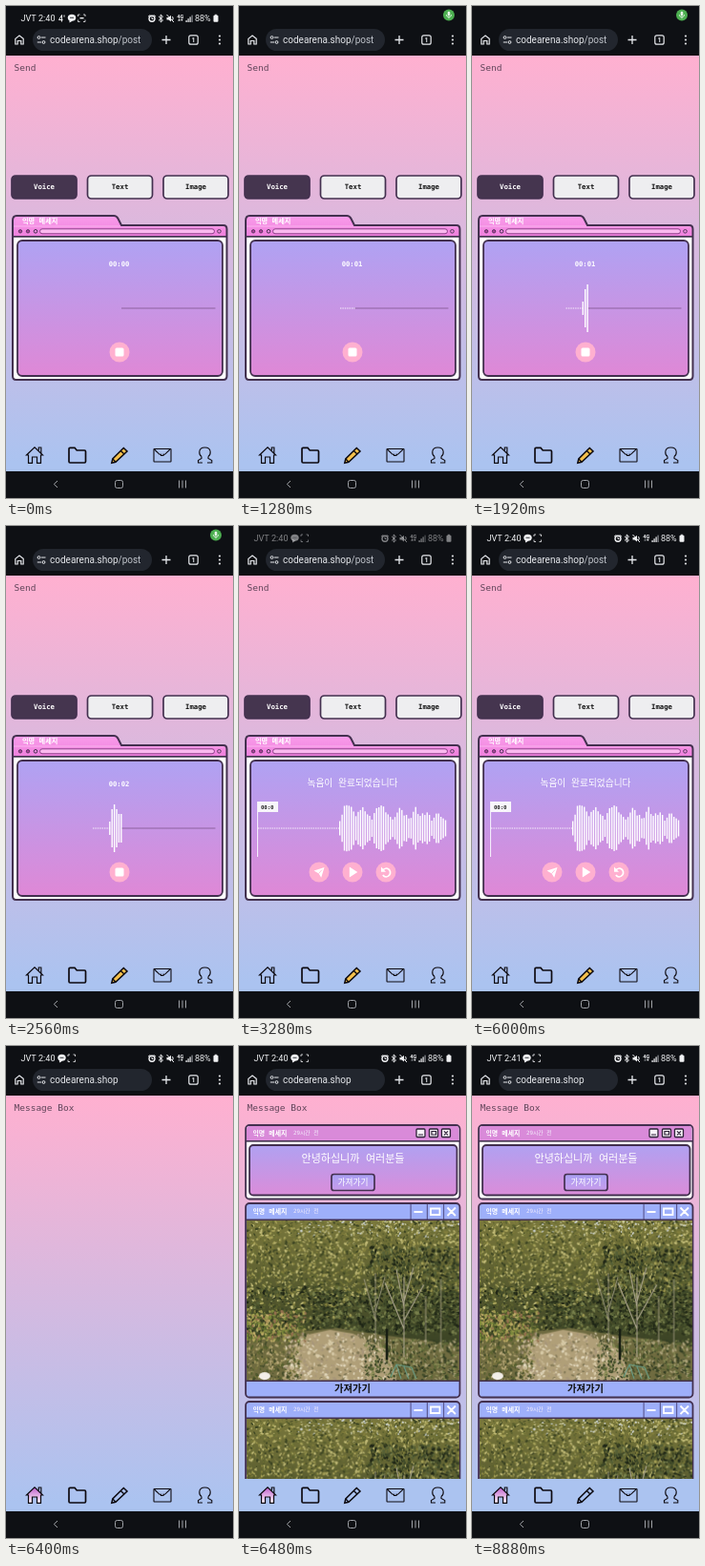
Animation, 238 px wide and 516 px high, one loop 9.36 s. Source, as an HTML page with a canvas:

```html
<!DOCTYPE html>
<html lang="ko">
<head>
<meta charset="utf-8">
<title>Voice message</title>
<style>
html, body { margin: 0; width: 100%; height: 100%; overflow: hidden; background: #0e1014; }
canvas { display: block; width: 238px; height: 516px; }
</style>
</head>
<body>
<canvas id="stage"></canvas>
<script>
const W = 238, H = 516, LOOP = 9360, TICK = 80;
const INK = '#43304f', DARK = '#0e1014', PINK = '#ffb0d0', SKY = '#abc3f0';
const PIXEL = '"DejaVu Sans Mono", "Noto Sans Mono CJK KR", "Noto Sans CJK KR", monospace';
const UI = 'Roboto, sans-serif';

const stage = document.getElementById('stage');
const dpr = window.devicePixelRatio || 1;
stage.width = W * dpr;
stage.height = H * dpr;
let c = stage.getContext('2d');
c.scale(dpr, dpr);

// ---------- helpers ----------
function box(x, y, w, h, r, fill, stroke, lw = 2) {
  c.beginPath();
  c.roundRect(x, y, w, h, r);
  paint(fill, stroke, lw);
}
function paint(fill, stroke, lw = 1) {
  if (fill) { c.fillStyle = fill; c.fill(); }
  if (stroke) { c.strokeStyle = stroke; c.lineWidth = lw; c.stroke(); }
}
function shape(d, fill, stroke, lw, x = 0, y = 0) {
  c.save();
  c.translate(x, y);
  if (fill) { c.fillStyle = fill; c.fill(new Path2D(d)); }
  if (stroke) { c.strokeStyle = stroke; c.lineWidth = lw || 1; c.stroke(new Path2D(d)); }
  c.restore();
}
function disc(x, y, r, fill, stroke, lw) {
  c.beginPath();
  c.arc(x, y, r, 0, 7);
  paint(fill, stroke, lw);
}
function rect(x, y, w, h, fill) {
  c.fillStyle = fill;
  c.fillRect(x, y, w, h);
}
function fade(y0, y1, a, b) {
  const g = c.createLinearGradient(0, y0, 0, y1);
  g.addColorStop(0, a);
  g.addColorStop(1, b);
  return g;
}
function text(s, x, y, size, fill, align = 'left', weight = 700, font = PIXEL) {
  c.font = `${weight} ${size}px ${font}`;
  c.textAlign = align;
  c.textBaseline = 'alphabetic';
  c.fillStyle = fill;
  c.fillText(s, x, y);
}
function random(seed) {
  return () => (seed = (seed * 16807) % 2147483647) / 2147483647;
}

// ---------- phone chrome ----------
// The capture icon blinks at these times; the data arrows flip at others.
const BLINKS = [160, 3680, 3920, 4560, 5120, 5680, 6000, 6960, 7440, 7600, 7920, 8640, 8880];
const DATA = [5280, 7440, 8400];
const odd = (list, t) => list.filter(v => v <= t).length % 2 === 1;

function statusBar(t) {
  if (t >= 400 && t < 3120) {
    disc(220, 9.5, 6, '#4caf50');
    box(218.7, 5.8, 2.6, 4.6, 1.3, '#e8f5e9');
    shape('M217.3 9Q217.3 11.6 220 11.6T222.7 9M220 11.6V13.3', null, '#e8f5e9', .8);
    return;
  }
  c.globalAlpha = t >= 3120 && t < 3440 ? (t - 3120) / 320 : 1;
  const white = '#f1f2f4';
  text(t < 7440 ? 'JVT 2:40' : 'JVT 2:41', 15.5, 16.3, 9.1, white, 'left', 400, UI);
  let x = t < 7440 ? 54.5 : 53.5;
  if (t < 400) {
    shape('M0 6L3 1V8M0 6H4M5.5 1V3', null, white, 1, x + 1, 8.5);
    x += 10.5;
  }
  c.beginPath();
  c.ellipse(x + 4, 12.3, 4.2, 3.5, 0, 0, 7);
  paint(white);
  shape('M1.5 14L1.5 17.5L5 15.5Z', white, null, 0, x, 0);
  rect(x + 2, 11.8, 4, 1, '#33363b');
  shape('M0 2V0H2M5.5 0H7.5V2M7.5 5.5V7.5H5.5M2 7.5H0V5.5', null, white, .8, x + 10.5, 9);
  if (!odd(BLINKS, t)) rect(x + 12.5, 12, 4, 1.4, white);

  disc(153, 13.3, 3, null, white, 1.4);
  shape('M149.3 11L151 9.3M155 9.3L156.7 11M153 11.5V13.5H154.5', null, white, 1);
  shape('M160 10.8L164.5 15L162.2 17V9L164.5 11.2L160 15.4', null, white, 1);
  shape('M168.5 12H170.5L173 9.7V16.5L170.5 14.5H168.5Z', white);
  shape('M168.5 9L176 17M174.5 11Q176 13 174.5 15', null, white, 1);
  text('4G', 179.3, 13, 5.6, white, 'left', 700, UI);
  const up = odd(DATA, t) ? '#777b80' : white;
  shape('M180 15.5L181.7 13.3L183 15.5Z', up);
  shape('M183 13.7L184.3 16L185.7 13.7Z', white);
  for (let i = 0; i < 4; i++) rect(188.5 + i * 2, 15 - i * 1.8, 1.2, 2 + i * 1.8, i < 3 ? white : '#8d9095');
  text('88%', 198, 16.3, 9, white, 'left', 400, UI);
  box(217.5, 9.8, 5, 7, 1, white);
  rect(218.8, 8.8, 2.4, 1, white);
  c.globalAlpha = 1;
}

function browser(t, path) {
  rect(0, 0, W, 52, DARK);
  statusBar(t);
  const white = '#e6e8ec';
  shape('M9.8 34.4L14 31L18.2 34.4V40H15.8V36.5H12.2V40H9.8Z', null, white, 1.2);
  box(28, 24, 125, 23, 11.5, '#22262e');
  disc(34.5, 33, 1.4, null, white, 1);
  disc(39.5, 38, 1.4, null, white, 1);
  shape('M37 33H41.5M32.8 38H37', null, white, 1.1);
  text('codearena.shop', 46, 39.2, 10, white, 'left', 400, UI);
  if (path) text(path, 46 + c.measureText('codearena.shop').width, 39.2, 10, '#c0c4cb', 'left', 400, UI);
  shape('M163.5 35.5H172.5M168 31V40', null, white, 1.3);
  box(191.8, 30.8, 9.4, 9.4, 2, null, white, 1.2);
  text('1', 196.5, 38, 7, white, 'center', 700, UI);
  for (const y of [31.5, 35.5, 39.5]) disc(224, y, 1.1, white);
}

function androidBar() {
  rect(0, 488, W, 28, DARK);
  const grey = '#a0a3a8';
  shape('M54 498L50.3 501.5L54 505', null, grey, 1);
  box(114.5, 497.5, 8, 8, 2, null, grey, 1);
  shape('M181.5 497.5V505.5M185 497.5V505.5M188.5 497.5V505.5', null, grey, 1);
}

function tabBar(home) {
  const ink = '#0d0a10';
  const house = 'M23.5 479.3V471H21.5L30 462.8L38.5 471H36.5V479.3H32.5V473H27.5V479.3Z';
  shape(house, home ? fade(464, 478, '#c468cf', '#fbeefa') : null, ink, 1.2);
  shape('M34.3 466V463H36.8V469', null, ink, 1.2);
  shape('M66 464.5Q66 463.3 67.2 463.3H72L74.2 466H82.3Q83.5 466 83.5 467.2V477.8Q83.5 479 82.3 479H67.2Q66 479 66 477.8Z', null, ink, 1.7);
  shape('M110.8 479.2L111.8 475L123.3 463.5L127 467L115 478.3Z', home ? null : '#f5c04c', ink, 1.5);
  shape('M120.3 466.5L124 470M111.8 475L115 478.3', null, ink, 1.4);
  box(155, 464.5, 18, 13.5, .5, null, ink, 1.1);
  shape('M155.5 465L161 470.3H162.5V471.5H165V470.3H166.5L172 465', null, ink, 1.1);
  shape('M205 472.5Q202.5 471 202.8 467.5Q203.2 463 208.5 463T214.2 467.5Q214.5 471 212 472.5M205 472.5V474.5L201.5 476.5V479H206M212 472.5V474.5L215.8 476.5V479H211', null, ink, 1.1);
}

// ---------- recorder ----------
const SCROLL = 15 / 1280, MID = 317, HEAD = 121;
const LIVE = [7, 20, 25, 20, 15, 15, 20, 17];
const ENVELOPE = [10, 26, 24, 13, 25, 20, 11, 27, 25, 18, 10, 23, 17, 11, 23, 14, 20, 10, 18, 11, 7];

function bar(x, half) {
  rect(x, MID - half, 1.4, half * 2, '#fff');
}
function dots(x0, x1) {
  for (let x = x0; x < x1; x += 2.4) rect(x, MID - .5, 1.4, 1, 'rgba(255,255,255,.85)');
}
function recording(t) {
  const sec = Math.floor(t / 1000);
  text('00:0' + sec, 118.5, 272.5, 7.2, '#fff', 'center');
  rect(HEAD, MID - .5, 98.5, 1, '#8d63a0');
  const start = HEAD - t * SCROLL;
  const voice = HEAD - (t - 1460) * SCROLL;
  dots(start, Math.min(HEAD, voice));
  LIVE.forEach((half, i) => {
    const x = voice + i * 2.4;
    if (x < HEAD - .4) bar(x, half);
  });
  disc(119, 363, 10.5, PINK);
  box(114.5, 358.5, 9, 9, 1.5, '#fff');
}
function recorded() {
  text('녹음이 완료되었습니다', 119, 273.3, 9.7, '#fff', 'center', 500);
  dots(20, 105);
  const rnd = random(41);
  const n = 47;
  for (let i = 0; i < n; i++) {
    const p = i / n * (ENVELOPE.length - 1), k = Math.floor(p);
    const half = ENVELOPE[k] + (ENVELOPE[k + 1] - ENVELOPE[k]) * (p - k);
    bar(105 + i * 2.41, half * (.75 + .25 * rnd()));
  }
  rect(19, 289, 1, 58, '#f4eefc');
  rect(19, 289, 22, 11, '#f7f5fa');
  text('00:0', 23, 297, 5.6, '#222');

  for (const x of [84, 119, 154]) disc(x, 363, 10.5, PINK);
  shape('M78.5 361.5L89.5 358L86.2 368.7L83.6 364.5Z', '#fff');
  shape('M83.6 364.5L87 360.5', null, PINK, .8);
  shape('M115.8 357.5L124.3 363L115.8 368.5Z', '#fff');
  c.beginPath();
  c.arc(154.3, 363.5, 4.3, -2.5, 2.5);
  paint(null, '#fff', 1.7);
  shape('M149 357.5V362.8H154Z', '#fff');
}
function modeButton(x, label, on) {
  box(x + 1, 178, 68, 24, 4, on ? '#45354f' : '#eeeef0', INK, 1.7);
  text(label, x + 35, 192.3, 7.3, on ? '#fff' : '#111', 'center');
}
function folder() {
  const outline = 'M7 225Q7 220 11 220H113Q116 220 117.5 223L121 230H228Q231.5 230 231.5 234V388Q231.5 392 228 392H10.5Q7 392 7 388Z';
  shape(outline, '#fff');
  c.save();
  c.clip(new Path2D(outline));
  rect(0, 219, W, 23, fade(220, 242, '#fa9deb', '#ef7fdc'));
  rect(7, 230.5, 225, 1, '#fbb6ef');
  rect(7, 241, 225, 1.7, INK);
  c.restore();
  shape(outline, null, INK, 2);
  text('익명 메세지', 17, 228.3, 7.2, '#fff');
  for (const x of [15, 23]) disc(x, 236.3, 1.7, '#b3409f', INK, .8);
  disc(31, 236.3, 1.8, null, INK, 1);
  box(35.5, 233.8, 183, 5, 2.5, '#fbb9ef', '#8d3d89', 1);
  disc(223.5, 236.3, 1.8, null, INK, .9);
  box(12, 246, 215, 142, 5, fade(246, 388, '#afa2f3', '#df88d6'), INK, 1.8);
}
function pageTitle(s) {
  text(s, 8.5, 68, 9.5, '#604459', 'left', 400);
}
function postPage(t) {
  pageTitle('Send');
  modeButton(5, 'Voice', true);
  modeButton(84.5, 'Text');
  modeButton(164, 'Image');
  folder();
  if (t < 3040) recording(t); else recorded();
  tabBar(false);
}

// ---------- message list ----------
// A simplified park scene: trees, a sandy path and a few bare trunks.
function park() {
  const art = document.createElement('canvas');
  art.width = 224 * dpr;
  art.height = 170 * dpr;
  const keep = c;
  c = art.getContext('2d');
  c.scale(dpr, dpr);
  const rnd = random(77);
  const leaves = (n, x, y, w, h, size, tones) => {
    for (let i = 0; i < n; i++) {
      c.beginPath();
      c.ellipse(x + rnd() * w, y + rnd() * h, size * (.4 + rnd()), size * (.3 + rnd() * .6), rnd() * 3, 0, 7);
      paint(tones[Math.floor(rnd() * tones.length)]);
    }
  };
  const light = ['#a5a058', '#827f3d', '#5a602e', '#c0ba76', '#6c7036', '#3d4523'];
  const deep = ['#2a321c', '#3a4426', '#1f2616', '#566036', '#414b2a', '#78804c'];
  rect(0, 0, 224, 170, fade(0, 130, '#7a783c', '#3b4325'));
  leaves(2600, 0, 0, 224, 80, 1.5, light);
  leaves(120, 50, 0, 174, 18, 1.2, ['#c9cfcc', '#c3c399']);
  leaves(700, 0, 70, 110, 50, 1.7, [...light, ...deep]);
  leaves(900, 70, 75, 154, 46, 1.8, deep);
  leaves(900, 130, 28, 94, 92, 1.8, deep);
  shape('M0 126L55 118L95 114L140 121L224 132V170H0Z', '#6f6b40');
  shape('M56 123L88 116L112 120L150 138L158 170H38Z', '#b09f78');
  leaves(420, 0, 96, 62, 32, 1.8, ['#7d8a3d', '#a09c50', '#59662f', '#c0ad68', '#94704e', '#3e4825']);
  leaves(350, 0, 128, 58, 42, 1.6, ['#77733e', '#9b925b', '#57612f', '#b8a878', '#454d2a']);
  leaves(420, 40, 120, 108, 50, 1.7, ['#d8cba8', '#a7967a', '#e0d6bb', '#7d7554', '#c2b18c']);
  leaves(600, 124, 126, 100, 44, 1.6, ['#5c6836', '#8a8d56', '#434d2a', '#aca27a', '#353f24']);
  const bark = '#aaa38c';
  shape('M166 145V60M166 115L146 66M166 106L187 68M166 92L158 52M166 86L176 50', null, bark, 1.1);
  shape('M136 130V56M136 105L124 62M136 96L146 60M189 132V80M205 136V62', null, bark, .8);
  shape('M148 115V148', null, '#171d12', 2.6);
  shape('M152 166L158 153L174 156L179 168M158 153L163 168M166 155L171 168', null, '#6a9a83', 1.2);
  c.beginPath();
  c.ellipse(19, 165, 6, 4, 0, 0, 7);
  paint('#f3eee8');
  c = keep;
  return art;
}
const scene = park();

function caption(y) {
  text('익명 메세지', 14.5, y, 6.9, '#fff');
  text('29시간 전', 57, y - .2, 5.8, '#f4eefc', 'left', 400);
}
function textCard() {
  box(7, 83, 224.5, 77.5, 4, '#fff', INK, 1.8);
  c.beginPath();
  c.roundRect(8, 84, 222.5, 15.5, [3, 3, 0, 0]);
  paint('#d98ad9');
  rect(7, 99, 224, 1.6, INK);
  caption(93.5);
  for (const x of [186, 199.5, 212.5]) box(x, 87, 9, 8.5, 1, '#f7f1f8', '#2e2238', 1.3);
  shape('M188 93H193M202 89.5H206.5V93H202ZM215 89.3L219 93.3M219 89.3L215 93.3', null, '#2e2238', 1.2);
  box(11, 104, 217.5, 52.5, 4, fade(104, 157, '#b0a1f1', '#db8cd9'), INK, 1.8);
  text('안녕하십니까 여러분들', 119.5, 122, 11, '#fff', 'center', 500);
  box(97, 134.5, 45, 17, 2.5, fade(134, 152, '#a7a0f4', '#c99bea'), INK, 1.7);
  text('가져가기', 119.5, 146.2, 8.7, '#fff', 'center', 500);
}
function photoCard(y) {
  box(7, y, 224.5, 203.5, 4, '#9eaffa', INK, 1.8);
  caption(y + 10.5);
  for (const x of [179.5, 196.8, 214]) rect(x, y + 1, 1.2, 16, '#5c5a94');
  shape('M183.5 9H192.5M201 5.5H210.5V12H201ZM218.5 4.5L227 13M227 4.5L218.5 13', null, '#fff', 1.8, 0, y);
  rect(7, y + 16.5, 224, 1.5, INK);
  c.drawImage(scene, 8, y + 18, 222.5, 168);
  rect(7, y + 185.5, 224, 1.5, INK);
  text('가져가기', 119, y + 198.3, 10.3, '#111', 'center');
}
function listPage(t) {
  pageTitle('Message Box');
  if (t >= 6480) {
    textCard();
    photoCard(165);
    photoCard(373);
    rect(0, 454, W, 34, SKY);
  }
  tabBar(true);
}

// ---------- loop ----------
function draw(t) {
  rect(0, 52, W, 436, fade(52, 478, PINK, SKY));
  const posting = t < 6240;
  if (posting) postPage(t); else listPage(t);
  browser(t, posting ? '/post' : '');
  androidBar();
}
const begin = performance.now();
function frame() {
  const t = (performance.now() - begin) % LOOP;
  draw(Math.floor(t / TICK) * TICK);
  requestAnimationFrame(frame);
}
frame();
</script>
</body>
</html>
```
